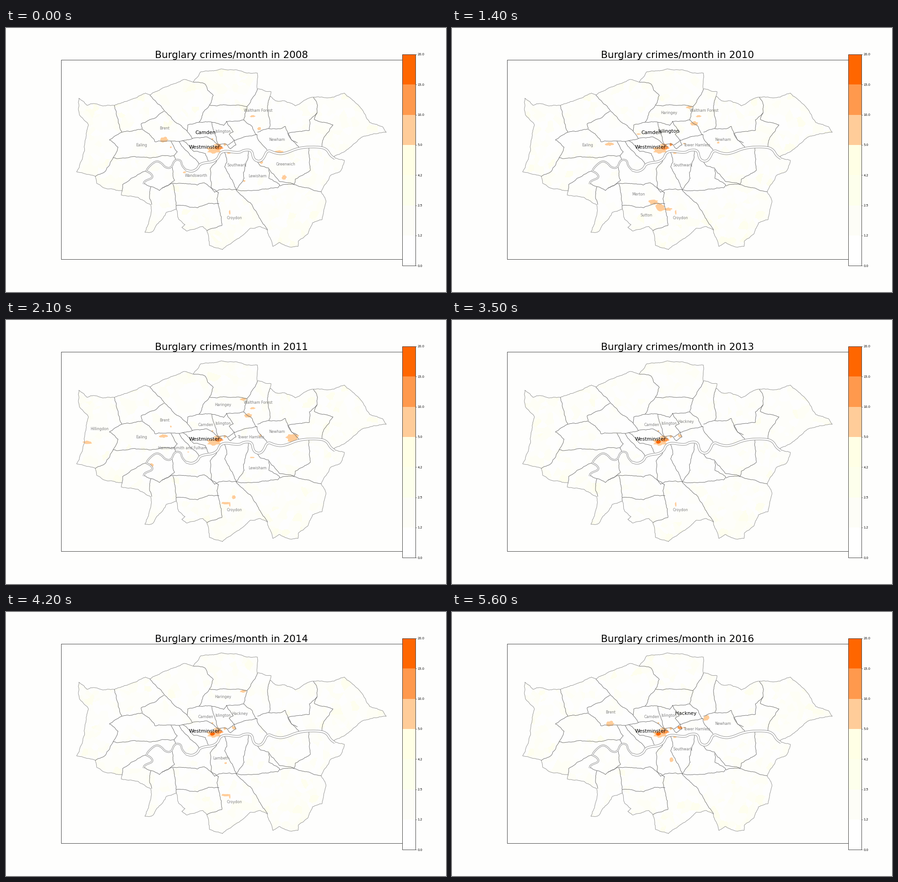
A matplotlib script for the animation above (6.3 s loop, 966 by 580 pixels).

```python
import numpy as np
import matplotlib.pyplot as plt
from matplotlib.animation import FuncAnimation
from matplotlib.patches import Polygon, Rectangle

W, H, DPI = 966, 580, 100
PX = 72 / DPI
YEARS = ["08", "09", "10", "11", "12", "13", "14", "15", "16"]
ALL = " ".join(YEARS)
PALETTE = ["#ffffff", "#fdfdf7", "#fdffec", "#ffffe5",
           "#ffcc99", "#ff994d", "#ff6600"]
GREY, DARK = "#808080", "#6c6c6c"

plt.rcParams["font.family"] = "DejaVu Sans"
fig = plt.figure(figsize=(W / DPI, H / DPI), dpi=DPI, facecolor="#fefefd")
ax = fig.add_axes([0, 0, 1, 1])
ax.axis("off")


def pairs(flat):
    return np.array(flat, float).reshape(-1, 2)


def rough(pts, bend=0.09, limit=1.6):
    """Fractal coastline: push every midpoint sideways, again and again."""
    rng = np.random.default_rng(int(pts.sum()))
    for _ in range(5):
        d = np.diff(pts, axis=0)
        length = np.hypot(d[:, 0], d[:, 1])
        if length.max() < 3:
            break
        size = np.where(length > 3, np.minimum(bend * length, limit), 0)
        push = rng.uniform(-1, 1, len(d)) * size / np.maximum(length, 1e-6)
        mid = (pts[:-1] + pts[1:]) / 2 + push[:, None] * d[:, ::-1] * [-1, 1]
        out = np.empty((len(pts) + len(mid), 2))
        out[::2], out[1::2] = pts, mid
        pts = out
    return pts


def smooth(pts):
    for _ in range(3):
        a, b = pts[:-1], pts[1:]
        cut = np.stack([a * .75 + b * .25, a * .25 + b * .75], 1)
        pts = np.vstack([pts[:1], cut.reshape(-1, 2), pts[-1:]])
    return pts


def stroke(pts, width, color, z):
    ax.plot(*pts.T, color=color, lw=width * PX, zorder=z,
            solid_joinstyle="round", solid_capstyle="butt")


def border(*flat):
    stroke(rough(pairs(flat)), 0.95, DARK, 5)


# Outer edge, clockwise from the north-west tip
north = pairs([160, 154, 178, 170, 193, 166, 208, 170, 238, 170, 284, 154,
               306, 143, 316, 147, 358, 127, 390, 113, 411, 119, 428, 96,
               472, 90, 522, 97, 552, 99, 552, 134, 582, 140, 580, 150,
               592, 160, 612, 160, 635, 171, 653, 160, 675, 152, 712, 153,
               743, 143, 768, 165, 781, 178, 798, 207, 827, 217, 835, 229,
               785, 238, 770, 250, 745, 270, 717, 284])
south = pairs([743, 291, 733, 316, 712, 324, 692, 360, 702, 378, 694, 421,
               673, 428, 663, 452, 642, 468, 641, 480, 622, 481, 600, 471,
               586, 480, 574, 444, 558, 436, 536, 440, 524, 452, 498, 470,
               475, 487, 447, 478, 441, 445, 432, 436, 396, 446, 386, 438,
               393, 432, 379, 420, 374, 398, 352, 405, 322, 447, 305, 449,
               318, 410, 318, 388, 290, 372, 253, 367, 255, 358, 218, 352,
               199, 341, 196, 326, 155, 316, 172, 271, 176, 238, 181, 213,
               161, 190, 160, 154])
outline = rough(np.vstack([north, south]))
stroke(outline, 0.9, "#8c8c8c", 5)
land = Polygon(outline, closed=True, fc="white", ec="none", zorder=1)
ax.add_patch(land)

# Borough borders: west
border(238, 170, 254, 229, 227, 246, 246, 262, 235, 285, 218, 315, 196, 326)
border(254, 229, 299, 222, 297, 210, 325, 199, 347, 183)
border(316, 147, 364, 199, 391, 221, 409, 243)
border(299, 223, 318, 237, 327, 250, 360, 248, 378, 249, 409, 243)
border(235, 285, 305, 284, 369, 281)
border(362, 249, 376, 272, 369, 280, 372, 290)
border(380, 249, 400, 273, 424, 299)
border(387, 247, 412, 271, 438, 276, 444, 292)
border(397, 227, 399, 213, 424, 207)
border(409, 243, 440, 239, 460, 252, 475, 261)
# North
border(411, 119, 437, 123, 443, 137, 455, 148, 447, 169, 437, 180, 424, 207,
       452, 207, 478, 214, 484, 205, 522, 202)
border(447, 169, 520, 171, 529, 173)
border(552, 134, 529, 173, 522, 202, 540, 216, 550, 235)
border(452, 207, 455, 223, 467, 257, 483, 255, 492, 265)
border(484, 205, 499, 228, 490, 233, 501, 246, 487, 257)
border(492, 266, 505, 257, 501, 247, 528, 238, 551, 234, 553, 244, 573, 268)
# East
border(580, 150, 574, 175, 580, 212, 577, 221, 552, 229)
border(577, 221, 604, 221, 613, 216, 622, 239, 643, 262)
border(620, 231, 628, 247, 640, 252)
border(620, 231, 666, 225, 666, 202, 683, 186, 684, 170, 675, 152)
border(683, 186, 677, 201, 718, 213, 697, 243, 694, 263)
# South-west
border(255, 358, 256, 344, 275, 330, 309, 314)
border(365, 306, 370, 335, 337, 357, 302, 340)
border(318, 349, 315, 372, 320, 388)
border(342, 352, 368, 341, 420, 345, 435, 340, 466, 362)
border(366, 342, 372, 370, 374, 398)
border(374, 390, 420, 395, 445, 385, 468, 386)
# South
border(463, 291, 448, 310, 450, 348, 458, 361, 476, 354, 505, 355)
border(480, 272, 485, 295, 480, 305, 492, 328, 505, 354)
border(467, 361, 463, 375, 473, 415, 474, 434, 441, 446)
border(505, 355, 540, 388, 574, 444)
border(532, 271, 531, 288, 521, 318, 523, 330, 505, 355, 535, 357, 597, 351,
       601, 345, 577, 330, 577, 308, 558, 303, 552, 292)
border(578, 310, 600, 337, 633, 343, 635, 332, 668, 313, 665, 263)
border(601, 347, 628, 343, 692, 360)

# River, wider downstream
upper = smooth(pairs([302, 343, 304, 336, 324, 329, 317, 318, 305, 314,
                      328, 291, 341, 296, 350, 307, 363, 308, 370, 289,
                      384, 290, 386, 302, 395, 312]))
lower = smooth(pairs([395, 312, 408, 316, 421, 309, 426, 297, 463, 293,
                      472, 268, 511, 275, 522, 268, 540, 268, 543, 288,
                      555, 294, 565, 288, 574, 267, 590, 275, 610, 277,
                      645, 262, 690, 261, 705, 267, 712, 280, 722, 287]))
for extra, color in ((0, GREY), (1.7, "white")):
    for part, width in ((upper, 3.6), (lower, 5.2)):
        stroke(part, width - extra, color, 6 + extra / 2)

# Pale small-area shading: stronger away from the centre
X0, X1, Y0, Y1 = 150, 840, 85, 490
rng = np.random.default_rng(7)
cells = rng.uniform((X0, Y0), (X1, Y1), (1500, 2))
base = rng.normal(size=len(cells))
remote = np.hypot((cells[:, 0] - 475) / 300, (cells[:, 1] - 275) / 180)
gx, gy = np.arange(X0, X1, 2) + 1, np.arange(Y0, Y1, 2) + 1
nearest = np.array([
    np.argmin((gx[:, None] - cells[:, 0]) ** 2 + (y - cells[:, 1]) ** 2, axis=1)
    for y in gy])
shades = np.array([[254, 254, top] for top in (254, 250, 245, 238)], np.uint8)


def shading(i):
    noise = np.random.default_rng(100 + i).normal(size=len(base))
    v = 0.4 * base + 0.4 * noise + 1.3 * (remote - 0.75)
    return shades[np.digitize(v, [-0.2, 0.55, 1.15])][nearest]


tint = ax.imshow(shading(0), extent=(X0, X1, Y1, Y0), interpolation="nearest",
                 aspect="auto", zorder=2)
tint.set_clip_path(land)
ax.set_xlim(0, W)
ax.set_ylim(H, 0)

shown = []  # (artist, years in which it is visible)


def hot(x, y, rx, ry, years, level=1):
    r = np.random.default_rng(int(x * 31 + y))
    a = np.linspace(0, 2 * np.pi, 14, endpoint=False)
    k = r.uniform(0.7, 1.25, 14)
    pts = np.column_stack([x + rx * k * np.cos(a), y + ry * k * np.sin(a)])
    patch = Polygon(pts, fc=PALETTE[3 + level], ec="none", zorder=3 + level / 10)
    ax.add_patch(patch)
    shown.append((patch, years))


def borough(name, x, y, *spots):
    """Draw hot spots; the name shows with any spot, big with a strong one."""
    strong, weak = set(), set()
    for spot in spots:
        hot(*spot)
        (strong if len(spot) > 5 else weak).update(spot[4].split())
    for years, size, color in ((weak - strong, 8.05, GREY),
                               (strong, 10.75, "black")):
        t = ax.text(x, y, name, fontsize=size * PX, color=color,
                    ha="center", va="baseline", zorder=9)
        shown.append((t, years))


borough("Westminster", 436, 264.8, (456, 269, 14, 8, ALL),
        (464, 258, 8, 4, ALL), (467, 264, 9, 4, ALL, 2),
        (453, 268, 6, 3, "12 13 14 15 16", 3))
borough("Camden", 438, 233, (453, 244, 2, 2, "08 11 13 14 15 16"),
        (409, 233, 5, 1.5, "10"), (468, 257, 3, 2, "08 09 10 12", 2))
borough("Islington", 476, 230.3, (481, 256, 3, 3, ALL),
        (481, 256, 3, 3, "10", 2))
borough("Hackney", 513.5, 226.3, (500, 254, 4, 4, "12 13 14 15"),
        (500, 254, 5, 4, "16", 2))
borough("Brent", 348, 223, (347, 245, 10, 6, "08 12 16"),
        (362, 234, 2, 2, "11 12"))
borough("Ealing", 298, 259.5, (345, 255, 9, 4, "09 10 11 12"),
        (362, 262, 2, 2, "08 12"))
borough("Waltham Forest", 553.5, 184, (542, 194, 6, 2.4, "08 09 10 11"),
        (556, 221, 4, 4, "08"), (532, 210, 8, 5, "09 10 11"))
borough("Newham", 595, 248, (598, 272, 11, 3, "08"),
        (584, 252, 3, 2, "09 10"), (629, 258, 14, 9, "11"),
        (558, 233, 6, 7, "12 16"))
borough("Haringey", 476.5, 189.3, (521, 174, 7, 3, "10 11 14"))
borough("Tower Hamlets", 538, 259.6, (510, 254, 4, 1.5, "10 16"),
        (558, 254, 3, 3, "11"), (520, 243, 3, 2, "12"))
borough("Southwark", 507, 304, (489, 274, 4, 3, "08 09 10 12 16"))
borough("Greenwich", 613.5, 302, (560, 295, 4, 3, "08"),
        (611, 328, 5, 5, "08"))
borough("Lewisham", 552, 327.5, (523, 336, 3, 2, "08"),
        (540, 302, 5, 1.5, "11"))
borough("Wandsworth", 417.5, 327, (392, 317, 4, 1.8, "08"))
borough("Croydon", 501.5, 419.5, (491, 405, 2, 5, ALL[:-6]),
        (482, 402, 9, 2.5, "11 14"), (500, 389, 4, 4, "11"),
        (474, 398, 8, 4, "10"))
borough("Merton", 409.5, 368, (443, 382, 10, 6, "10"))
borough("Sutton", 427, 414.5, (457, 395, 11, 9, "10"))
borough("Hillingdon", 205, 242.5, (179, 269, 9, 4, "11"))
borough("Hammersmith and Fulham", 387.5, 284, (400, 290, 2, 1, "11"))
borough("Bexley", 681, 314, (668, 274, 3, 3, "12"))
borough("Bromley", 613, 401, (664, 376, 3, 4, "12"))
borough("Lambeth", 472, 324, (482, 332, 3, 2, "14"))
hot(179, 269, 9, 4, "12")
hot(482, 325, 4, 5, "16")
hot(320, 319, 5, 4, "11")


def box(x, y, w, h, z, fill="none", edge="none"):
    ax.add_patch(Rectangle((x, y), w, h, fc=fill, ec=edge, lw=0.9 * PX, zorder=z))


# Map frame, colour bar and title
LINE = "#333333"
box(120.5, 69.5, 749.5, 438, 8, edge=LINE)
TOP, BOTTOM = 58, 522.3
band = (BOTTOM - TOP) / len(PALETTE)
for k, color in enumerate(PALETTE):
    box(870, BOTTOM - (k + 1) * band, 28.5, band, 10, fill=color)
box(870, TOP, 28.5, BOTTOM - TOP, 11, edge=LINE)
for k, value in enumerate((0, 1.2, 2.5, 4.2, 5, 10, 15, 20)):
    y = BOTTOM - k * band
    stroke(np.array([[898.5, y], [901.2, y]]), 0.8, LINE, 11)
    ax.text(903.3, y + 2.5, f"{value:.1f}", fontsize=6.71 * PX, va="baseline")
title = ax.text(494.7, 66, "", fontsize=21.5 * PX, ha="center", va="baseline")


def update(i):
    title.set_text(f"Burglary crimes/month in 20{YEARS[i]}")
    tint.set_data(shading(i))
    for artist, years in shown:
        artist.set_visible(YEARS[i] in years)
    return []


anim = FuncAnimation(fig, update, frames=len(YEARS), interval=700,
                     init_func=lambda: update(0), repeat=True, repeat_delay=0,
                     blit=False)
plt.show()
```
